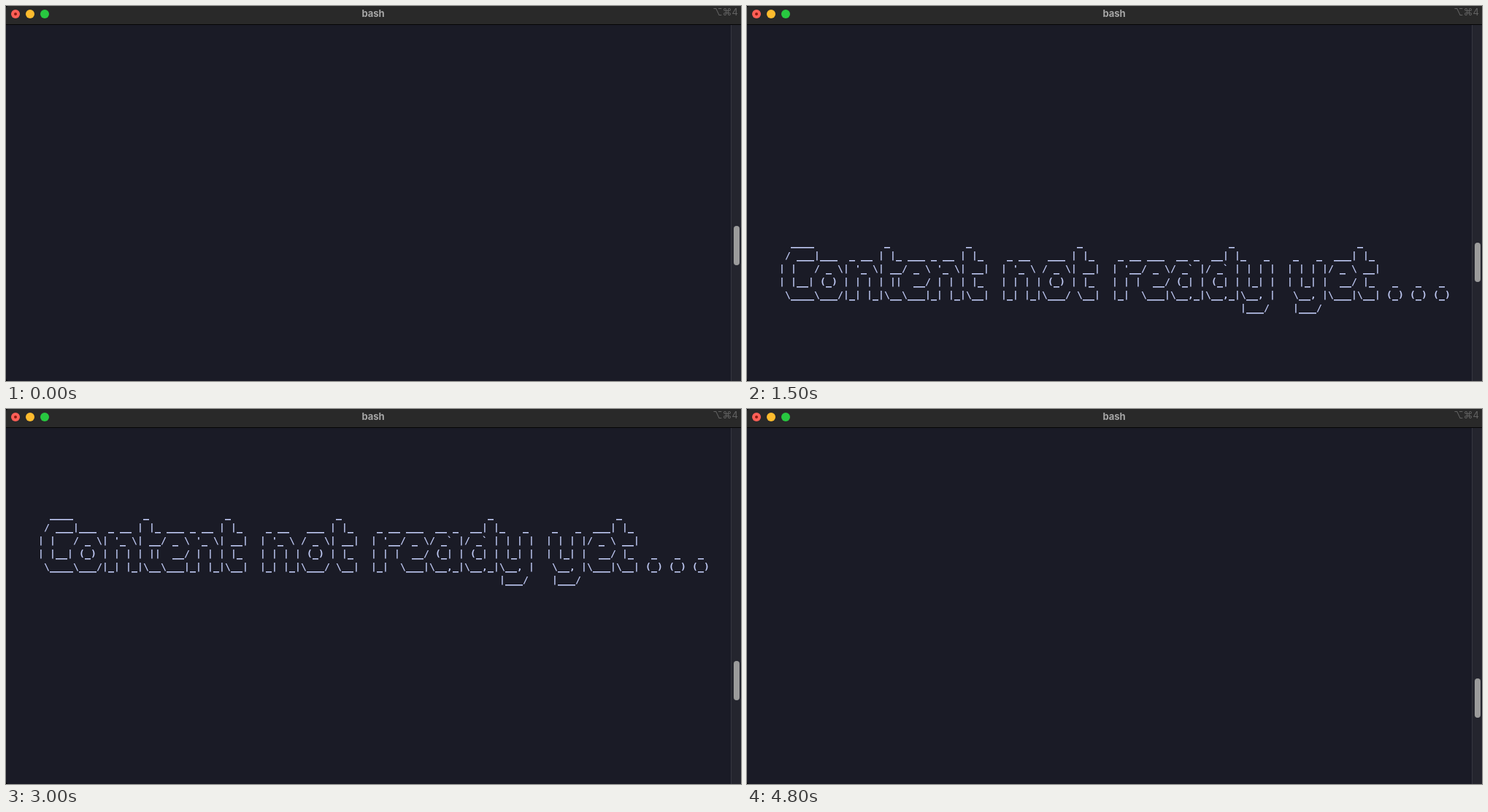
Animation, 1007 px wide and 515 px high, one loop 5.1 s. Source, as an HTML page with a canvas:

```html
<!DOCTYPE html>
<html lang="en">
<head>
<meta charset="utf-8">
<title>Terminal</title>
<style>
html, body { margin: 0; width: 100%; height: 100%; overflow: hidden; background: #000; }
canvas { display: block; }
</style>
</head>
<body>
<canvas id="stage" width="1007" height="515"></canvas>
<script>
const ctx = document.getElementById('stage').getContext('2d');
const W = 1007, H = 515, BAR = 25;
const STEP = 300, STEPS = 17;
const CELL = 8, LINE = 18, LEFT = 44;
const FIRST_BASE = 473;   // baseline of the top banner row after one step

// one entry per word, each holding the six rows of its letters
const words = [
  { col: 0, rows: [
    String.raw`  ____            _             _`,
    String.raw` / ___|___  _ __ | |_ ___ _ __ | |_`,
    String.raw`| |   / _ \| '_ \| __/ _ \ '_ \| __|`,
    String.raw`| |__| (_) | | | | ||  __/ | | | |_`,
    String.raw` \____\___/|_| |_|\__\___|_| |_|\__|`,
    ''] },
  { col: 38, rows: [
    String.raw`             _`,
    String.raw` _ __   ___ | |_`,
    String.raw`| '_ \ / _ \| __|`,
    String.raw`| | | | (_) | |_`,
    String.raw`|_| |_|\___/ \__|`,
    ''] },
  { col: 57, rows: [
    String.raw`                    _`,
    String.raw` _ __ ___  __ _  __| |_   _`,
    "| '__/ _ \\/ _` |/ _` | | | |",
    String.raw`| | |  __/ (_| | (_| | |_| |`,
    String.raw`|_|  \___|\__,_|\__,_|\__, |`,
    String.raw`                      |___/`] },
  { col: 87, rows: [
    String.raw`            _`,
    String.raw` _   _  ___| |_`,
    String.raw`| | | |/ _ \ __|`,
    String.raw`| |_| |  __/ |_   _   _   _`,
    String.raw` \__, |\___|\__| (_) (_) (_)`,
    String.raw` |___/`] }
];

const thumbTops = [302, 308, 313, 316, 320, 325, 329, 332, 337,
                   341, 346, 350, 353, 358, 362, 365, 370];

function rect(color, x, y, w, h) {
  ctx.fillStyle = color;
  ctx.fillRect(x, y, w, h);
}

function pill(color, x, y, w, h, r) {
  ctx.fillStyle = color;
  ctx.beginPath();
  ctx.roundRect(x, y, w, h, r);
  ctx.fill();
}

function dot(color, x, y, r) {
  ctx.fillStyle = color;
  ctx.beginPath();
  ctx.arc(x, y, r, 0, Math.PI * 2);
  ctx.fill();
}

function label(text, x, y, font, color, align) {
  ctx.font = font;
  ctx.fillStyle = color;
  ctx.textAlign = align;
  ctx.fillText(text, x, y);
}

function drawRow(text, col, base) {
  [...text].forEach((ch, i) => {
    const x = LEFT + (col + i) * CELL;
    if (ch === '_') ctx.fillRect(x, base + 2, CELL, 1.6);
    else if (ch !== ' ') ctx.fillText(ch, x + CELL / 2, base);
  });
}

function drawBanner(step) {
  const top = FIRST_BASE - (step - 1) * 2 * LINE;
  ctx.font = 'bold 13px "DejaVu Sans Mono", monospace';
  ctx.fillStyle = '#c0caf5';
  ctx.textAlign = 'center';
  for (const { col, rows } of words) {
    rows.forEach((row, i) => {
      const base = top + i * LINE;
      if (base > BAR + 6 && base < H) drawRow(row, col, base);
    });
  }
}

function drawTitleBar() {
  rect('#292929', 0, 0, W, BAR);
  rect('#050506', 0, BAR, W, 1);
  dot('#ff5f57', 13, 11, 6);
  dot('#8c1a10', 13, 11, 2);
  dot('#febc2e', 33, 11, 6);
  dot('#28c840', 53, 11, 6);
  label('bash', 503, 15, 'bold 13px Inter, sans-serif', '#a6a6a6', 'center');
  label('⌥⌘4', 1003, 13, '13px Inter, "DejaVu Sans", sans-serif', '#626262', 'right');
}

function drawScrollbar(step) {
  rect('#24252e', 993, BAR + 1, 14, H - BAR - 1);
  rect('#363740', 993, BAR + 1, 1, H - BAR - 1);
  pill('#9b9b9b', 997, thumbTops[step], 8, 54, 4);
}

function draw(step) {
  rect('#000', 0, 0, W, H);
  ctx.save();
  ctx.beginPath();
  ctx.roundRect(0, 0, W, H, [4, 0, 0, 4]);
  ctx.clip();
  rect('#1a1b26', 0, 0, W, H);
  if (step > 0) drawBanner(step);
  drawScrollbar(step);
  drawTitleBar();
  ctx.restore();
}

const start = performance.now();
function tick() {
  const t = Math.max(0, performance.now() - start);
  draw(Math.floor(t / STEP) % STEPS);
  requestAnimationFrame(tick);
}
tick();
</script>
</body>
</html>
```
